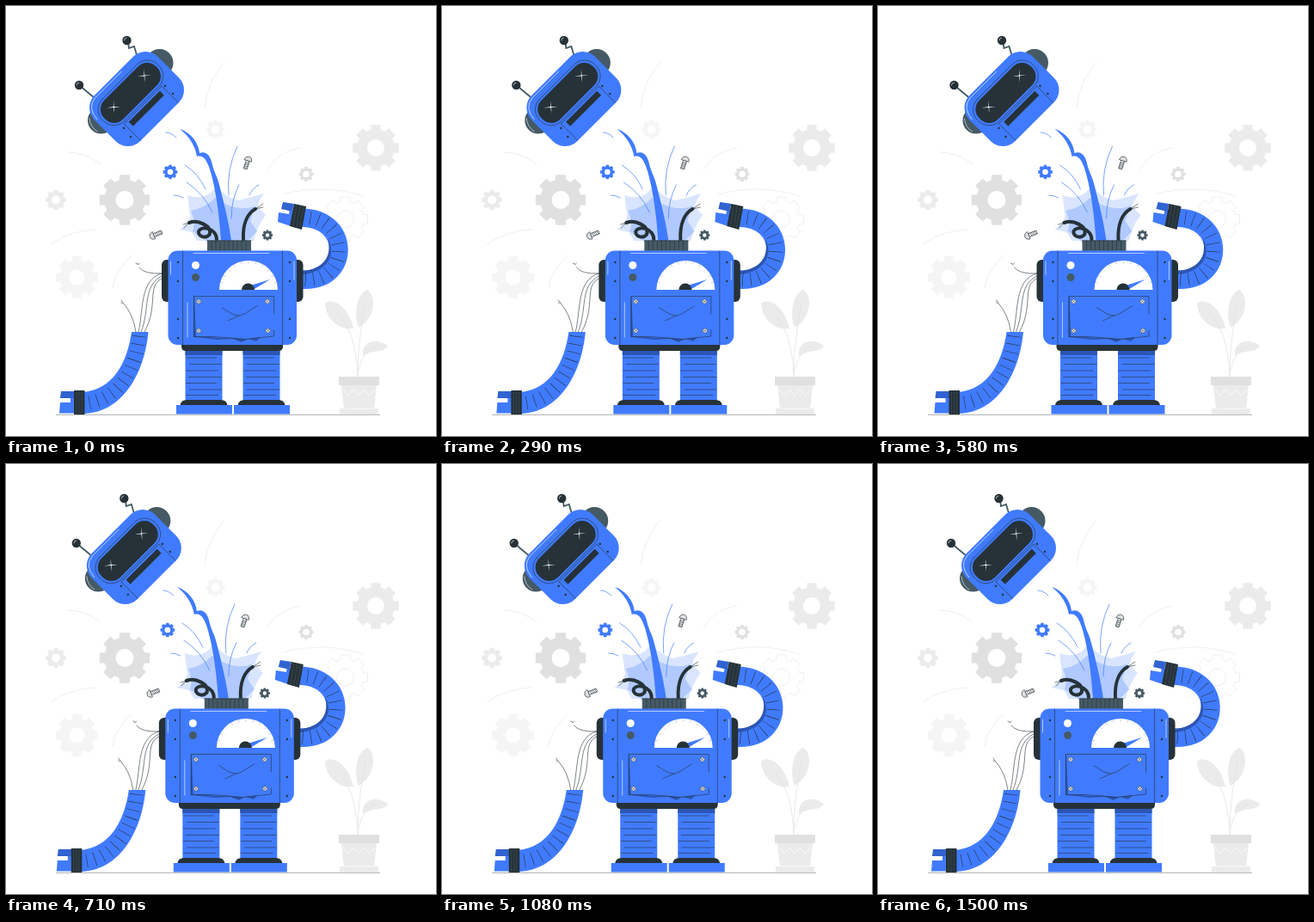
An HTML page that plays this animation: 500x500 px, repeating every 1.54 s.

```html
<!DOCTYPE html>
<html lang="en">
<head>
<meta charset="utf-8">
<title>Broken robot</title>
<style>
  html, body { margin: 0; width: 100%; height: 100%; overflow: hidden; background: #fff; }
  svg { display: block; width: 100vw; height: 100vh; }
  .blue { fill: #407bff; }
  .deep { fill: #2c56b3; }
  .dark { fill: #263238; }
  .slate { fill: #455a64; }
  .line { fill: none; stroke: #263238; stroke-width: .6; stroke-linecap: round; stroke-linejoin: round; }
  .ray { fill: none; stroke: #407bff; stroke-width: .7; stroke-linecap: round; }
  .shine { fill: none; stroke: #fff; stroke-width: .8; stroke-linecap: round; opacity: .75; }
  .cable { fill: none; stroke: #263238; stroke-width: 4; stroke-linecap: round; }
  .trail { fill: none; stroke: #ebebeb; stroke-width: .8; stroke-linecap: round; }
  .ribs { fill: none; stroke: #263238; stroke-width: 16; stroke-dasharray: .6 8.8; }
</style>
</head>
<body>
<svg viewBox="0 0 500 500">
  <defs>
    <g id="bolt">
      <path d="M-2 1V11H2V1Z" fill="#fff" stroke="#263238" stroke-width=".6"/>
      <path d="M-2 4L2 3M-2 6L2 5M-2 8L2 7M-2 10L2 9" class="line"/>
      <path d="M-4.5 1Q-4-4 0-4T4.5 1Z" fill="#e0e0e0" stroke="#263238" stroke-width=".6"/>
    </g>
    <g id="leg">
      <path class="blue" d="M0 401H43V459H0Z"/>
      <path class="deep" d="M0 401H43V406H0Z"/>
      <path class="line" d="M1 409H36M5 416.5H42M1 424H38M4 431.500H42M1 438.5H36M5 446H42M1 452.5H38"/>
      <path class="dark" d="M-6 464Q-5 458 2 458H41Q48 458 49 464Z"/>
      <path class="blue" d="M-10.5 464H54.5V474.5H-10.5Z"/>
    </g>
    <g id="screw">
      <circle r="2.6" fill="#f0f0f0" stroke="#263238" stroke-width=".5"/>
      <path class="line" d="M-1.1-1.1L1.1 1.1M1.1-1.1L-1.1 1.1"/>
    </g>
  </defs>

  <g id="backdrop">
    <path class="trail" d="M231 118Q234 88 254 65M72 170Q92 170 110 184M304 190Q318 168 343 165M321 219Q370 206 415 221M52 277Q75 261 104 260M124 328Q127 308 146 290"/>
    <g fill="#ebebeb">
      <path d="M371 346C378 338 398 348 404 375C390 378 372 366 371 346Z"/>
      <path d="M420 330C430 335 431 362 410 374C404 360 407 335 420 330Z"/>
      <path d="M415 407C413 391 429 384 444 395C440 404 426 399 415 407Z"/>
      <path d="M390 441H431L428 469H393Z"/>
      <path d="M388 468H433V474.5H388Z"/>
    </g>
    <path fill="#e0e0e0" d="M387 431H434V441H387Z"/>
    <path fill="none" stroke="#e0e0e0" stroke-width=".7" d="M385 356C402 375 408 400 409 431M418 345C412 380 409 400 409 431M430 395Q414 402 410 424"/>
    <path fill="none" stroke="#fafafa" d="M392 446L398 453L404 446L410 453L416 446L422 453L429 446M394 468H428"/>
  </g>
  <path d="M58 475.3H435" stroke="#263238" stroke-width=".4"/>

  <g id="robot">
    <!-- burst -->
    <path fill="#d9e5ff" d="M202 260Q213 251 214 244L211 220Q226 226 238 217L245 209Q254 222 270 226Q284 223 300 218Q292 229 293 234L302 243Q292 256 288 273H222L216 263Z"/>
    <path fill="#b0c9ff" d="M217 262Q221 252 215 238Q230 236 243 223Q256 233 272 235Q282 236 290 232L284 250L292 262L280 274H234Z"/>
    <path class="blue" d="M202 143C215 147 224 159 225 171C232 168 238 173 240 185C243 196 245 196 248 208C253 228 259 250 262 273H250C248 240 243 209 237 190C233 178 229 173 222 175C220 163 213 151 202 143Z"/>
    <path class="ray" d="M186 147Q192 147 198 153M269 163Q256 190 259 220M208 185Q224 195 232 213M195 220Q201 220 206 223M283 220Q286 212 294 208M210 205Q230 218 240 240M262 247Q262 225 271 208"/>

    <!-- neck cables -->
    <path class="cable" d="M213 252C224 248 239 256 237 265C234 271 223 269 224 262C227 255 245 258 245 272M276 272C275 253 281 241 290 236"/>
    <path class="line" d="M213 252L206 254M213 252L207 258M290 236L299 230M290 236L299 234"/>
    <path class="slate" d="M234 272.5H285V285H234Z"/>
    <path class="line" d="M234 273H285M239 273V284M244 273V284M249 273V284M254 273V284M259 273V284M264 273V284M269 273V284M274 273V284M279 273V284"/>

    <use href="#bolt" transform="translate(281.5 179) rotate(18)"/>
    <use href="#bolt" transform="translate(171 267) rotate(-112)"/>

    <!-- right arm -->
    <path fill="none" stroke="#407bff" stroke-width="21.5" d="M344 318C374 320 387 301 387 283C386 262 371 247 344 246"/>
    <path class="deep" d="M374 270C380 292 368 306 345 308V312C372 310 386 290 374 270Z"/>
    <path class="ribs" d="M348 318C374 320 387 301 387 283C386 262 371 247 350 246"/>
    <path class="blue" d="M317 240L329 242L330 237L335 238L331 256L316 251Z"/>
    <path fill="#3163d1" d="M322 228L335 230L333 239L320 236Z"/>
    <path class="dark" d="M335 230L349 233L344 260L330 256Z"/>
    <path d="M338 232L334 256M342 233L338 257M346 234L341 258" stroke="#455a64" stroke-width=".5"/>

    <!-- left arm and torn wires -->
    <path class="line" d="M151 379Q148 358 136 345M154 379C160 355 155 318 181 311M157 379C168 352 158 326 181 314M161 379C178 348 163 326 181 317M155 304Q160 312 182 311M136 345L134 342M135 346L134 345M153 300L151 299M155 299L153 301"/>
    <path class="blue" d="M146 379H165.5C161 428 135 473 90 474V449C124 446 141 415 146 379Z"/>
    <path class="ribs" d="M155 384C151 420 132 459 92 462"/>
    <path class="blue" d="M63 461H75V456H80V473.5H62Z"/>
    <path fill="#3163d1" d="M64 448H80V456H63Z"/>
    <path class="dark" d="M79 447H91.5V475H79Z"/>
    <path d="M82 448V474M85 448V474M88 448V474" stroke="#455a64" stroke-width=".5"/>

    <!-- legs and torso -->
    <use href="#leg" x="208.5"/>
    <use href="#leg" x="275.5"/>
    <path class="dark" d="M204 392H322V396Q322 401 317 401H209Q204 401 204 396Z"/>
    <rect class="dark" x="181" y="295" width="18" height="49" rx="6"/>
    <rect class="dark" x="328" y="295" width="17.5" height="49" rx="6"/>
    <rect class="blue" x="188.5" y="284.5" width="149.5" height="109.5" rx="11"/>
    <path class="line" d="M205.5 285V394M321.5 285V394"/>
    <path class="shine" d="M218 287.5H306M191.5 297V312M211 345V385M335 297V318"/>
    <circle cx="220.5" cy="301.5" r="4.5" fill="#fff"/>
    <circle class="slate" cx="220.5" cy="315.5" r="4.5"/>
    <path fill="#fff" d="M248 330A34 34 0 0 1 316 330Z"/>
    <path id="ticks" class="line" style="stroke-width:.25"/>
    <path class="blue" d="M281 326L307 318L284 332Z"/>
    <path class="dark" d="M274 330A7.5 7.5 0 0 1 289 330Z"/>
    <path class="deep" d="M218 337L221 340V383L247 386L268 386L280 387L296 385L291 390L281 387L274 391L264 387L246 388L218 385Z"/>
    <path class="blue" d="M219 337.5H311.5V384.5H221Z"/>
    <path class="line" d="M311.5 358V337.5H218.5V384.5H240L262 386L274 388L311.5 384V377M251 351C258 354 262 360 272 360C280 358 285 352 292 349M258 366L271 360"/>
    <use href="#screw" x="224" y="343.5"/>
    <use href="#screw" x="304" y="343.5"/>
    <use href="#screw" x="224" y="377.5"/>
    <use href="#screw" x="304.5" y="377.5"/>

    <!-- head -->
    <path d="M85 92L103 107M142 42L143 49L149 47L152 57" fill="none" stroke="#455a64" stroke-width="1.8"/>
    <circle class="dark" cx="85" cy="92" r="5.2"/>
    <circle class="dark" cx="140.5" cy="40" r="5.2"/>
    <path class="shine" d="M82 92Q82 89 85 89M137.5 40Q137.5 37 140 37"/>
    <circle class="slate" cx="178.5" cy="66" r="16"/>
    <circle class="slate" cx="110.5" cy="133" r="15.5"/>
    <path class="shine" d="M97 131Q98 141 106 146"/>
    <g transform="translate(152 108) rotate(-45)">
      <rect class="blue" x="-52" y="-37.5" width="104" height="75" rx="20"/>
      <rect class="line" x="-45.5" y="-28" width="91" height="36" rx="17"/>
      <rect class="dark" x="-42.5" y="-25.5" width="85" height="31" rx="14.5"/>
      <rect class="dark" x="-25.5" y="12.5" width="51" height="7"/>
      <path class="line" d="M-31 10V37M31 10V37M-31 10H31"/>
      <path class="shine" d="M-49.5-16Q-48-34-33-35H10"/>
    </g>
    <path fill="#fff" d="M125 110L125.600 117L133 117L125.700 118L126 125L124.900 118L117 118.500L124.900 117ZM160.500 73L161.200 80.400L169 80.500L161.300 81.300L161.500 89L160.500 81.400L153 82L160.500 80.500Z"/>
  </g>
</svg>
<script>
  const svg = document.querySelector('svg');
  const robot = document.getElementById('robot');
  const backdrop = document.getElementById('backdrop');

  function add(parent, tag, attrs) {
    const el = document.createElementNS(svg.namespaceURI, tag);
    for (const key in attrs) el.setAttribute(key, attrs[key]);
    parent.append(el);
  }

  // Eight-toothed wheel with a round hole.
  function gear(parent, x, y, radius, hole, attrs) {
    const profile = [[-.27, .8], [-.2, 1], [.2, 1], [.27, .8], [Math.PI / 8, .8]];
    const points = [];
    for (let i = 0; i < 8; i++) {
      for (const [angle, scale] of profile) {
        const a = i * Math.PI / 4 + angle, r = radius * scale;
        points.push((x + r * Math.sin(a)).toFixed(2) + ' ' + (y - r * Math.cos(a)).toFixed(2));
      }
    }
    const ring = `M${x - hole} ${y}a${hole} ${hole} 0 1 0 ${2 * hole} 0a${hole} ${hole} 0 1 0 ${-2 * hole} 0Z`;
    add(parent, 'path', { d: `M${points.join('L')}Z${ring}`, 'fill-rule': 'evenodd', ...attrs });
  }

  gear(backdrop, 138, 225.5, 29.8, 10.5, { fill: '#e0e0e0' });
  gear(backdrop, 430, 165, 27.3, 10, { fill: '#ebebeb' });
  gear(backdrop, 82.5, 315.5, 25, 9, { fill: '#f5f5f5' });
  gear(backdrop, 58, 225.5, 12, 5, { fill: '#ebebeb' });
  gear(backdrop, 243.5, 143.5, 11, 5, { fill: '#f5f5f5' });
  gear(backdrop, 349, 195.5, 8.6, 3.8, { fill: '#e0e0e0' });
  gear(backdrop, 394.5, 248, 26.5, 10, { class: 'trail' });
  gear(robot, 191, 193, 8.5, 3.3, { class: 'blue' });
  gear(robot, 304, 266.5, 6.2, 2.2, { class: 'slate' });

  let ticks = '';
  for (let i = 1; i < 12; i++) {
    const a = i * Math.PI / 12, c = Math.cos(a), s = Math.sin(a);
    ticks += `M${282 - 31 * c} ${330 - 31 * s}L${282 - 33 * c} ${330 - 33 * s}`;
  }
  document.getElementById('ticks').setAttribute('d', ticks);

  for (const y of [298, 320, 364, 386]) {
    for (const x of [200, 330]) add(robot, 'circle', { cx: x, cy: y, r: 1.2, class: 'dark' });
  }
  for (const [x, y] of [[137, 142], [145, 152], [185, 93], [194, 102]]) {
    add(robot, 'circle', { cx: x, cy: y, r: 1.2, class: 'dark' });
  }

  // Horizontal shake, one stop per tenth of its 1.5 s period, shown at 24 fps.
  const stops = [0, -1, 2, -4, 4, -4, 4, -4, 2, -1, 0];
  const LOOP = 1540, STEP = 1000 / 24, PERIOD = 1500, LEAD = 30;

  function shake(ms) {
    const p = ms % PERIOD / PERIOD * 10, i = Math.floor(p);
    return stops[i] + (stops[i + 1] - stops[i]) * (p - i);
  }

  const start = performance.now();
  function draw(now) {
    const t = Math.max(0, now - start) % LOOP;
    const shown = Math.floor((t + 4.9) / STEP) % 37 * STEP;
    const dx = shake(shown + LEAD) - shake(LEAD);
    robot.setAttribute('transform', `translate(${dx.toFixed(3)} 0)`);
    requestAnimationFrame(draw);
  }
  draw(start);
</script>
</body>
</html>
```
